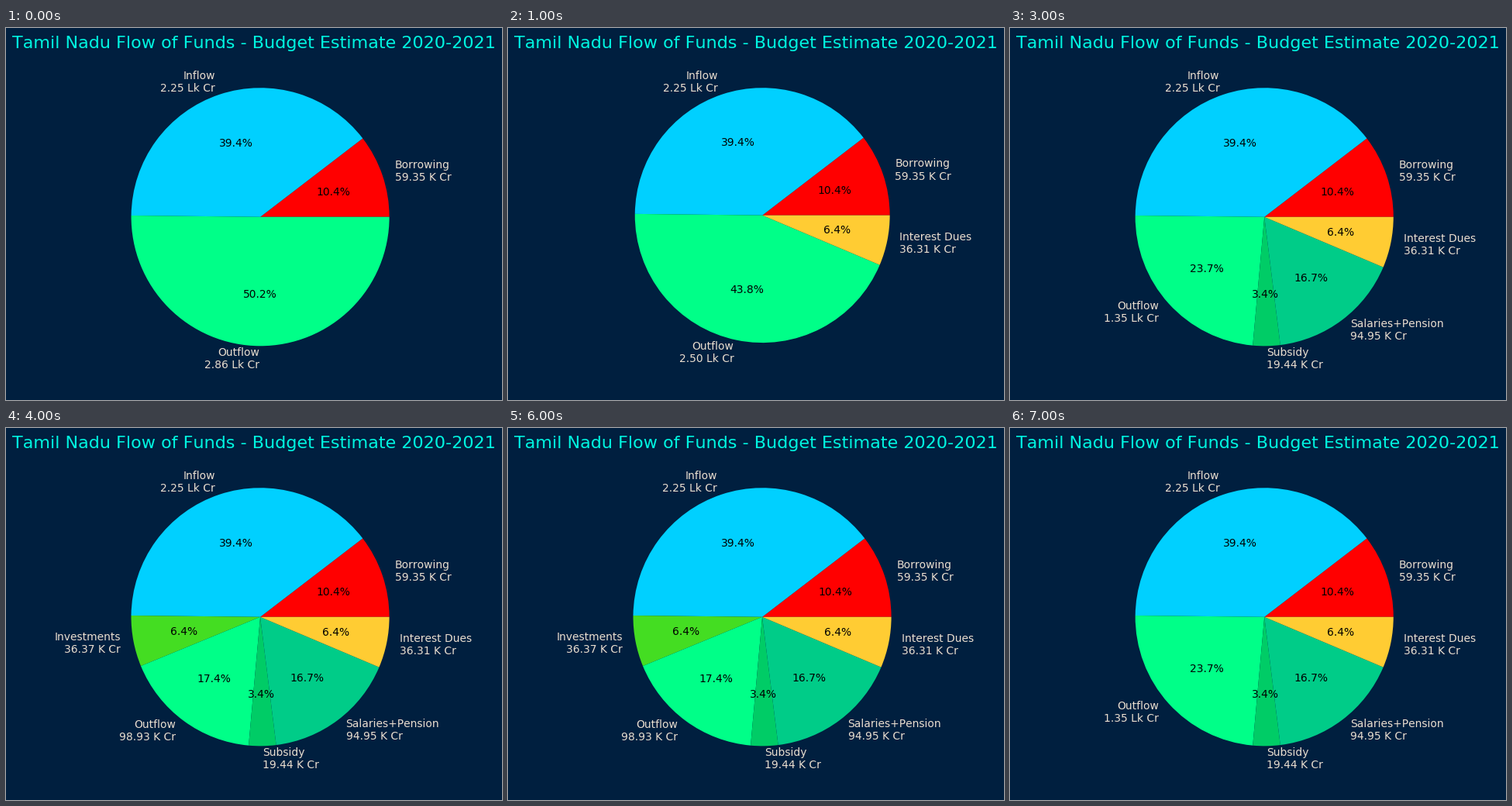
Recreate the animation shown at these times as a matplotlib script. Size 640 by 480 pixels, loop 8000 ms.

```python
import matplotlib.pyplot as plt
import numpy as np
from matplotlib.animation import FuncAnimation

NAVY = "#001f3f"
TITLE = "#00f5e0"
LABEL = "#eaddcf"

# Amounts in thousand crore
BORROWING = ("Borrowing", 59.35, "#ff0000")
INFLOW = ("Inflow", 224.70, "#00d0ff")
OUTFLOW_TOTAL = 286.00

# Parts split off the outflow, in order of appearance;
# the flag tells whether a part sits before the remaining outflow
PARTS = [
    ("Interest Dues", 36.31, "#ffcc33", False),
    ("Salaries+Pension", 94.95, "#00cc88", False),
    ("Subsidy", 19.44, "#00cc66", False),
    ("Investments", 36.37, "#44dd22", True),
    ("Loans+Advances", 23.12, "#88dd33", True),
]
STEPS = [0, 1, 2, 3, 4, 5, 4, 3]

plt.rcParams["font.family"] = "DejaVu Sans"
plt.rcParams["text.kerning_factor"] = 6  # whole-pixel kerning
fig, ax = plt.subplots(figsize=(6.4, 4.8), dpi=100, facecolor=NAVY)
fig.suptitle("Tamil Nadu Flow of Funds - Budget Estimate 2020-2021",
             fontsize=16, color=TITLE)


def amount(value):
    if value >= 100:
        return f"{value / 100:.2f} Lk Cr"
    return f"{value:.2f} K Cr"


def slices(count):
    shown = PARTS[:count]
    rest = OUTFLOW_TOTAL - sum(part[1] for part in shown)
    before = [part[:3] for part in shown if part[3]]
    after = [part[:3] for part in shown if not part[3]]
    outflow = ("Outflow", rest, "#00ff88")
    return [BORROWING, INFLOW, *before, outflow, *reversed(after)]


def draw(frame):
    ax.clear()
    names, values, colors = zip(*slices(STEPS[frame]))
    labels = [f"{name}\n{amount(v)}" for name, v in zip(names, values)]
    wedges, texts, _ = ax.pie(values, labels=labels, colors=colors,
                              autopct="%1.1f%%")
    for text in texts:
        text.set_color(LABEL)
    # Fit the view to the curve control points, so the size varies slightly
    ax.update_datalim(np.vstack([w.get_path().vertices for w in wedges]))
    ax.axis("equal")
    return []


anim = FuncAnimation(fig, draw, frames=len(STEPS), init_func=lambda: [],
                     interval=1000, repeat=True, repeat_delay=0)
plt.show()
```
